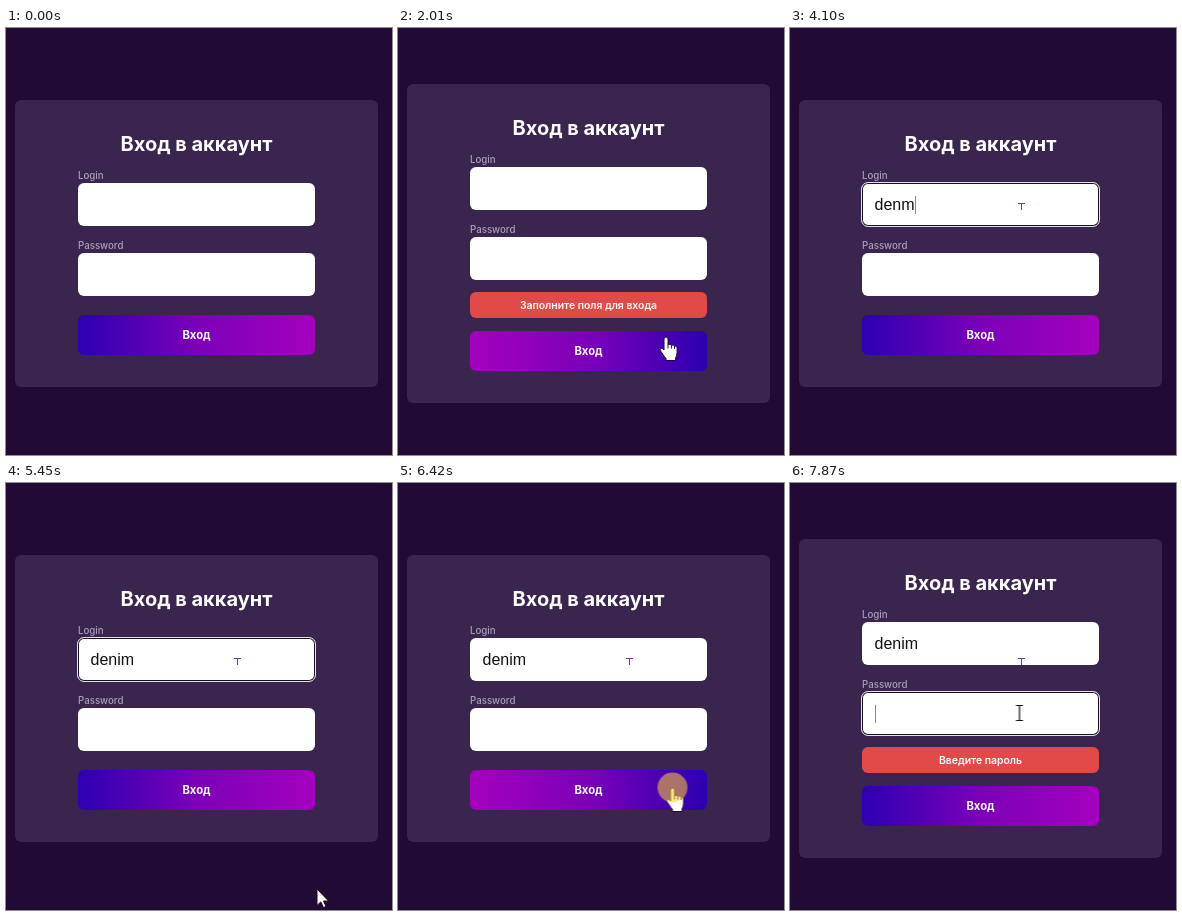
These frames come from a looping animation (386 px wide and 427 px high, 8 s). An HTML page:

```html
<!DOCTYPE html>
<html lang="ru">
<head>
<meta charset="utf-8">
<title>Вход</title>
<style>
html, body { margin: 0; width: 100%; height: 100%; overflow: hidden; background: #210a34; }
body { position: relative; font: 600 10px Inter, "Open Sans", sans-serif; color: #fff; }
div, svg { position: absolute; box-sizing: border-box; }

/* every part shares one 8 s clock; .cut parts change hard */
.anim { animation: 8s linear infinite; }
.cut { animation: 8s step-end infinite; }

#card { left: 9px; top: 72px; width: 363px; height: 287px; border-radius: 6px; background: #3a254f; animation-name: card; }
#form { left: 0; top: 0; width: 386px; animation-name: lift; }
#title { left: 0; top: 102px; width: 381px; font-weight: 700; font-size: 20px; line-height: 29px; text-align: center; white-space: nowrap; }
.label { left: 72px; line-height: 14px; font-weight: 500; font-size: 9.7px; color: #ab9fbb; }
.field { left: 72px; width: 237px; height: 43px; border-radius: 6px; background: #fff; color: #111; font: 16px/18px "Liberation Sans", Arial, sans-serif; }
.ring { inset: -1px; border: 1px solid #e4dfe8; border-radius: 7px; box-shadow: inset 0 0 0 1px #17101f; opacity: 0; }
.text { left: 12.5px; top: 13px; height: 18px; white-space: pre; }
.caret { right: -1px; top: 0; width: 1px; height: 18px; background: #8a80a0; opacity: 0; }
.bar { left: 72px; width: 237px; border-radius: 6px; text-align: center; }
.alert { top: 264px; height: 26px; line-height: 27px; font-size: 10.4px; background: #e14a48; opacity: 0; }
#btn { top: 287px; height: 40px; line-height: 40px; font-weight: 700; font-size: 11.3px; animation-name: drop; }
#fill { inset: 0; border-radius: 6px; background: linear-gradient(90deg, #2c00b2, #7c00b8 25%, #a400be 50%, #7c00b8 75%, #2c00b2) 0 0 / 200% 100%; animation-name: hover; }
#btn span { position: relative; }

#loginRing { animation-name: loginRing; }
#loginCaret { animation-name: loginCaret; }
#passRing, #passCaret { animation-name: passFocus; }
#empty { animation-name: empty; }
#noPass { animation-name: noPass; }

svg { left: 0; top: 0; width: 1px; height: 1px; overflow: visible; }
#cursor { animation-name: move; }
#cursor path { fill: #fff; stroke: #1a0f2a; stroke-linejoin: round; opacity: 0; }
#cursor circle { fill: rgba(255, 210, 44, .55); opacity: 0; animation-name: click; }
#arrow { animation-name: arrow; }
#hand { animation-name: hand; }
#cursor #beam { fill: none; stroke: #111; stroke-width: 1.2; animation-name: beam; }
#trace { fill: none; stroke: #84309a; opacity: 0; animation-name: trace; }

@keyframes card {
  0%, 32.75% { top: 72px; height: 287px; }
  15.125%, 82.375%, 100% { top: 56px; height: 319px; }
}
@keyframes lift {
  0%, 32.75% { transform: none; }
  15.125%, 82.375%, 100% { transform: translateY(-16px); }
}
@keyframes drop {
  0%, 32.75% { transform: none; }
  15.125%, 82.375%, 100% { transform: translateY(16px); }
}
@keyframes hover {
  0%, 10%, 30%, 75.75%, 89.375%, 91.625%, 95%, 100% { background-position: 0 0; }
  13.375%, 26.375%, 80.25%, 86.25% { background-position: 100% 0; }
  92.875% { background-position: 30% 0; }
}
@keyframes empty { 0%, 32.75%, 100% { opacity: 0; } 15.125% { opacity: 1; } }
@keyframes noPass { 0% { opacity: 0; } 82.375%, 100% { opacity: 1; } }
@keyframes loginRing { 0%, 79.375%, 100% { opacity: 0; } 30.25% { opacity: 1; } }
@keyframes loginCaret { 0%, 64.625%, 100% { opacity: 0; } 30.25% { opacity: 1; } }
@keyframes passFocus { 0% { opacity: 0; } 97.5%, 100% { opacity: 1; } }
@keyframes trace { 0% { opacity: 0; } 32.75%, 100% { opacity: 1; } }
@keyframes click {
  0%, 15.125%, 32%, 82%, 100% { opacity: 0; }
  12.625%, 29.5%, 79.375% { opacity: 1; }
}
@keyframes arrow {
  0%, 10.875%, 27.375%, 76.75%, 91.625%, 94%, 100% { opacity: 0; }
  7.375%, 26.375%, 65.5%, 86.25%, 92.875% { opacity: 1; }
}
@keyframes hand {
  0%, 26.375%, 86.25%, 92.875%, 100% { opacity: 0; }
  10.875%, 76.75%, 91.625% { opacity: 1; }
}
@keyframes beam {
  0%, 34.5%, 65.5% { opacity: 0; }
  27.375%, 64.625%, 94%, 100% { opacity: 1; }
}
@keyframes move {
  0%, 8.25% { transform: translate(318px, 397px); }
  10.875% { transform: translate(288px, 325px); }
  12.625%, 16.75% { transform: translate(269px, 311px); }
  17.625%, 26% { transform: translate(268px, 309px); }
  29.5%, 64.625% { transform: translate(231.5px, 160px); }
  68.125%, 69.875% { transform: translate(311px, 406px); }
  74.125% { transform: translate(300px, 348px); }
  76.75% { transform: translate(285px, 322px); }
  79.375%, 85.375% { transform: translate(274.5px, 305px); }
  88.875%, 89.75% { transform: translate(344px, 399px); }
  95%, 100% { transform: translate(229.5px, 230px); }
}
</style>
</head>
<body>
<div id="card" class="cut"></div>
<div id="form" class="cut">
  <div id="title">Вход в аккаунт</div>
  <div class="label" style="top:141px">Login</div>
  <div class="field" style="top:155px">
    <div id="loginRing" class="ring cut"></div>
    <div class="text"><span id="login"></span><div id="loginCaret" class="caret cut"></div></div>
  </div>
  <div class="label" style="top:211px">Password</div>
  <div class="field" style="top:225px">
    <div id="passRing" class="ring cut"></div>
    <div class="text"><div id="passCaret" class="caret cut"></div></div>
  </div>
</div>
<div id="empty" class="bar alert cut">Заполните поля для входа</div>
<div id="noPass" class="bar alert cut">Введите пароль</div>
<div id="btn" class="bar cut"><div id="fill" class="anim"></div><span>Вход</span></div>
<svg><path id="trace" class="cut" d="M228 175.5h7M231.5 176v6"/></svg>
<svg id="cursor" class="anim">
  <path id="arrow" class="cut" d="M0 0V16.5L3.8 12.9 6.5 18.5 9 17.4 6.5 12H11.5z"/>
  <path id="hand" class="cut" d="M-2 2a2 2 0 0 1 4 0v6c1-1.2 3.2-.8 3.4.6 1-.9 3-.5 3.2.9 1.2-.5 2.5.2 2.5 1.6V16c0 2-1 3-1.5 5v2.5H0v-2C-2 19-4.8 15-5.6 13.4c-.8-1.8 1.1-3 2.4-1.6L-2 13zM2 8v3.5M5.4 8.6v3M8.6 9.5v2.4"/>
  <path id="beam" class="cut" d="M-3.5-7.5h7M0-7.5v15M-3.5 7.5h7"/>
  <circle class="cut" cy="-.5" r="15"/>
</svg>
<script>
const keys = [
  [0, ''], [2690, 'ф'], [3300, 'фв'], [3430, 'ф'], [3500, ''],
  [3760, 'd'], [3830, 'de'], [3900, 'den'], [4100, 'denm'],
  [4370, 'den'], [4570, 'deni'], [4640, 'denim']
];
const lead = 40; // text is ready just before its key time
const login = document.getElementById('login');
const clock = document.getElementById('card').getAnimations()[0];

function type() {
  const t = (clock.currentTime || 0) % 8000 + lead;
  const text = keys.filter(([at]) => at <= t).pop()[1];
  if (login.textContent !== text) login.textContent = text;
  requestAnimationFrame(type);
}
type();
</script>
</body>
</html>
```
